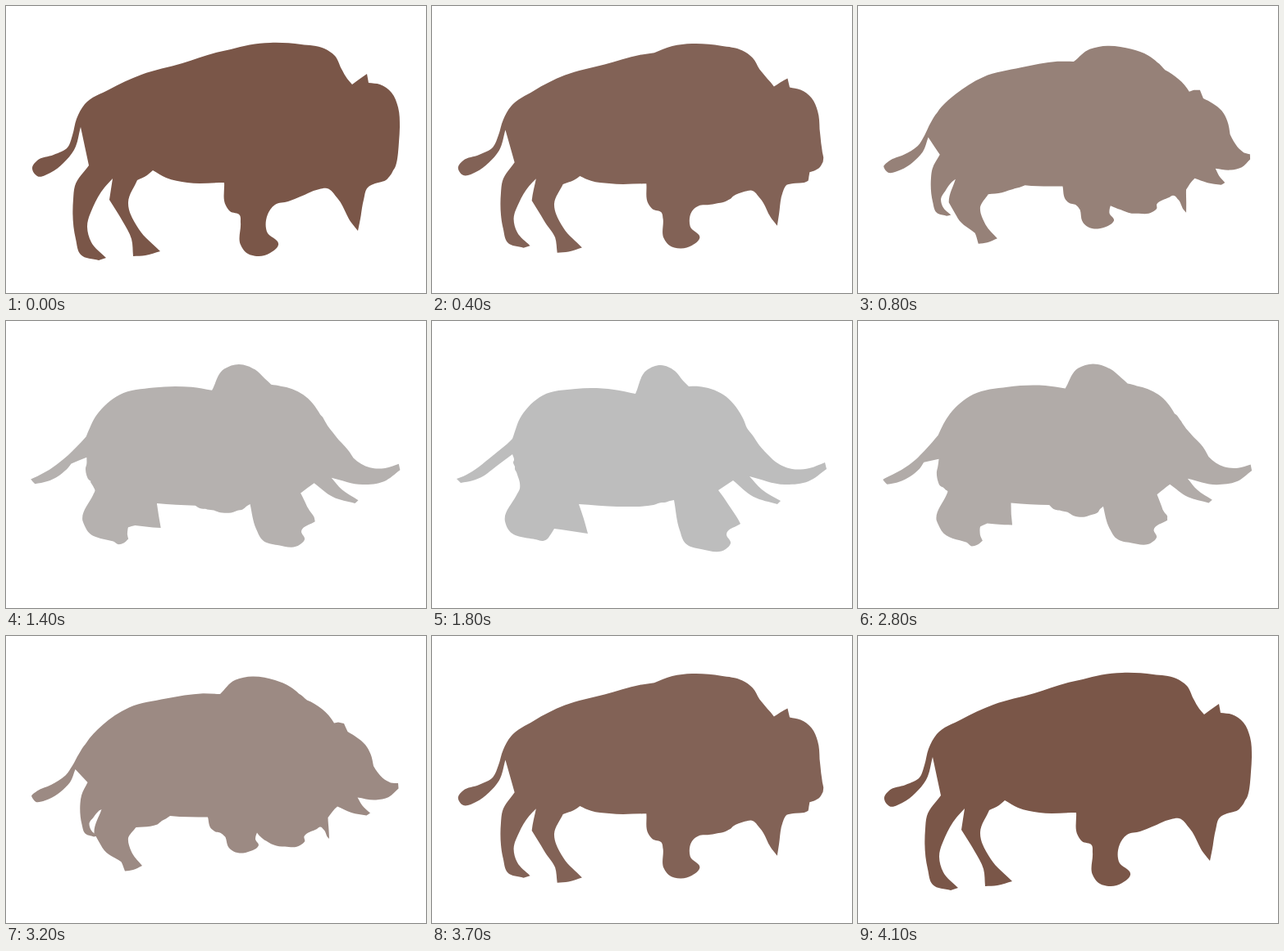
Write an HTML page that moves like this. It is 512 px wide and 351 px high and loops after 4600 ms.

```html
<!DOCTYPE html>
<html lang="en">
<head>
<meta charset="utf-8">
<title>Bison and elephant morph</title>
<style>
  html, body { margin: 0; width: 100%; height: 100%; overflow: hidden; background: #fff; }
  svg { display: block; width: 100%; height: 100%; }
</style>
</head>
<body>
<svg viewBox="0 0 512 351"><path id="animal"/></svg>
<script>
// Each point: bison x, y, elephant x, y, corner (1 bison, 2 elephant, 3 both).
const back = [
  [422,96,378,117,1], [416,89,355,90], [409,77,325,80], [401,61,313,80,2],
  [388,52,306,73], [360,47,296,61], [322,45,279,54], [297,47.5,262,60],
  [274,53,248,89,2], [258,56.5,222,84], [215,70,175,83], [165,84,135,91],
  [126,102,109,116], [96,120,98,144,2]
];
const tail = [
  [86,138,92,150], [81,158,81,159], [75,173,70,168], [58,182,52,182],
  [38,189,38,190], [32,198,30,193,2], [38,208,35,198,2], [54,204,50,195],
  [70,192,62,190], [83,176,73,182], [91,148,78,178,1]
];
const hindLegs = [
  [101,195,98,163,3], [84,220,100,170], [82,236,99,173], [85,285,100,176],
  [91,304,101,178], [113,311,101,180,1], [122,308,101,181,1], [104,289,103,185],
  [99,270,104,188], [106,246,107,198], [120,222,107,205], [130,211,103,213,1],
  [126,237,89,245,1], [142,263,93,255], [153,285,128,267.5], [155,306,135,269,1],
  [170,305,140,267], [188,300,144,262,1], [162,273,146,259], [149,240,149,254,2],
  [160,213,157,255,1], [172,207,180,258.5], [179,201,190,260,3], [195,210,185,242],
  [221,216,179,224,2]
];
const foreLeg = [
  [266,216,226,227,1], [268,244,232,227], [273,251,236,227], [285,256,240,227],
  [286,265,249,227], [286,292,258,226.5], [292,301,263,226], [308,306,270,225],
  [322,302,280,222], [332,292,283,222], [318,276,290,220], [317,262,295,219,2],
  [328,243,302,256], [344,239,309,272], [352,236,328,279], [359,233,358,279],
  [364,231,364,272], [368,229,359,261], [382,224,376,248,2], [391,223,374,244],
  [404,235,371,239], [421,265,363,227], [429,275,359,221,1], [432,260,355,215],
  [436,237,349,207,2]
];
const head = [
  [441,222,367,195,2], [450,217,392,215], [458,215,421,224,2], [463,213,425,220,2],
  [467,209,402,206], [470,205,387,190,2], [472,201,430,200], [474,198,459,196],
  [476,192,481,181,2], [477,187,479,173,2], [478,179,460,180], [479,166,439,181],
  [480,148,416,170], [478,124,411,165], [470,106,406,160], [456,96,399,152],
  [442,94,391,140,1], [440,83,384,131,1], [430,90,380,121]
];
const points = [...back, ...tail, ...hindLegs, ...foreLeg, ...head];

// Closed Bezier outline as flat numbers: handle in, point, handle out.
function outline(offset, flag) {
  const pts = points.map(p => [p[offset], p[offset + 1]]);
  const n = pts.length;
  return pts.flatMap(([x, y], i) => {
    const [px, py] = pts[(i + n - 1) % n], [nx, ny] = pts[(i + 1) % n];
    if (points[i][4] & flag)
      return [x + (px - x) / 3, y + (py - y) / 3, x, y, x + (nx - x) / 3, y + (ny - y) / 3];
    const before = Math.hypot(x - px, y - py), after = Math.hypot(nx - x, ny - y);
    const dx = (x - px) / before * after + (nx - x) / after * before;
    const dy = (y - py) / before * after + (ny - y) / after * before;
    const len = 3 * Math.hypot(dx, dy) || 1;
    const ux = dx / len, uy = dy / len;
    return [x - ux * before, y - uy * before, x, y, x + ux * after, y + uy * after];
  });
}

const bison = { shape: outline(0, 1), color: [122, 86, 72] };
const elephant = { shape: outline(2, 2), color: [189, 189, 189] };
const animal = document.getElementById('animal');
const STEP = 100, STEPS = 18, HALF = 2300;

function draw(time) {
  const t = time % (2 * HALF);
  const step = Math.min(STEPS, Math.floor((t % HALF) / STEP));
  const ease = (1 - Math.cos(Math.PI * step / STEPS)) / 2;
  const amount = t < HALF ? ease : 1 - ease;
  const mix = (a, b) => a.map((v, i) => v + (b[i] - v) * amount);

  const c = mix(bison.shape, elephant.shape);
  let d = `M${c[2]} ${c[3]}`;
  for (let i = 0; i < c.length; i += 6) {
    const j = (i + 6) % c.length;
    d += `C${[c[i + 4], c[i + 5], c[j], c[j + 1], c[j + 2], c[j + 3]]}`;
  }
  animal.setAttribute('d', d + 'Z');
  animal.setAttribute('fill', `rgb(${mix(bison.color, elephant.color).map(Math.round)})`);
}

const start = performance.now();
function tick() {
  draw(performance.now() - start);
  requestAnimationFrame(tick);
}
tick();
</script>
</body>
</html>
```
